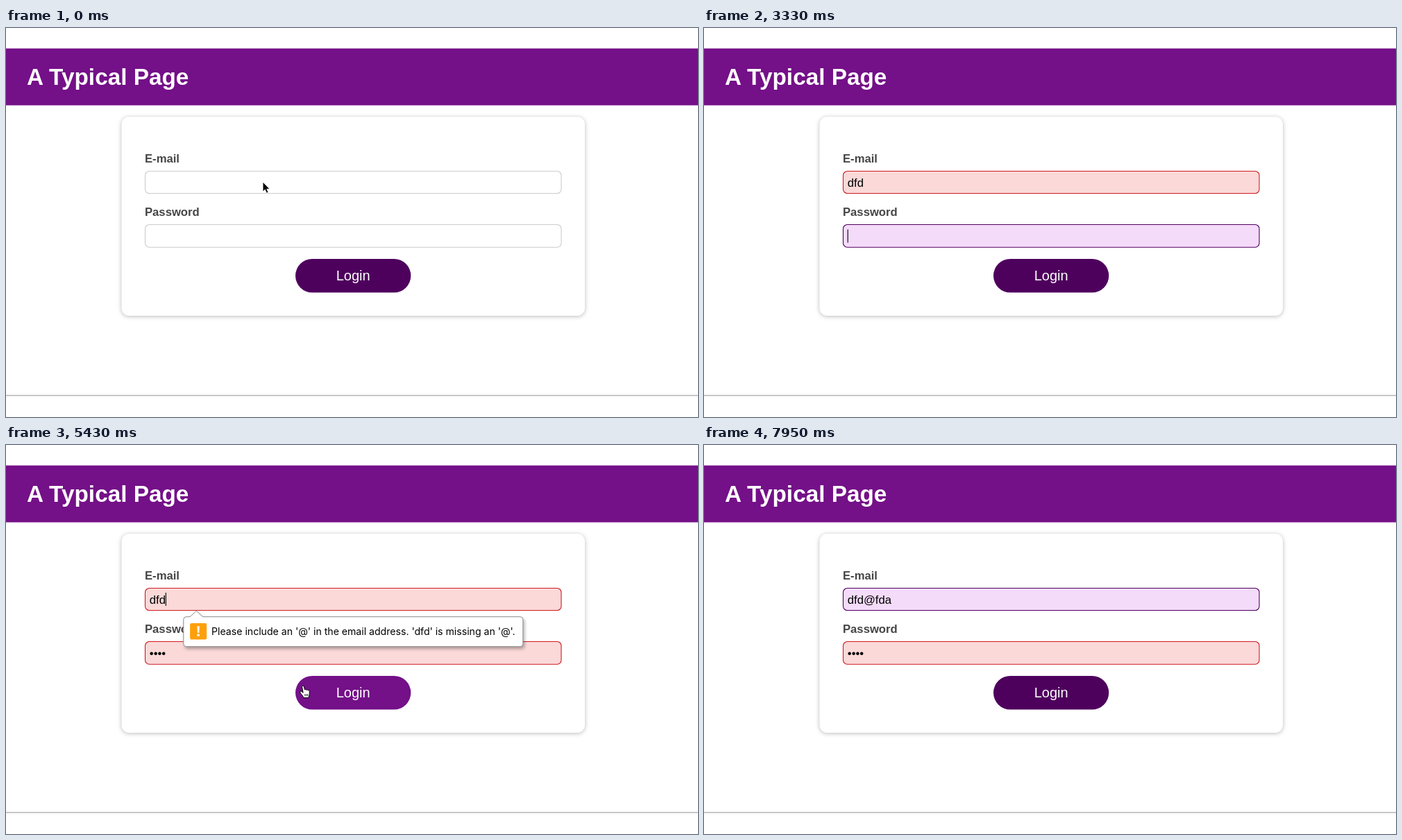
Recreate the animation shown at these times as an HTML page. Size 997 by 561 pixels, loop 8 s.

```html
<!DOCTYPE html>
<html lang="en">
<head>
<meta charset="utf-8">
<title>Login form</title>
<style>
  html, body { margin: 0; width: 100%; height: 100%; overflow: hidden; background: #fff; }
  svg { display: block; width: 100%; height: 100%; }
  text { font-family: "Liberation Sans", Arial, sans-serif; font-size: 16.67px; white-space: pre; }
  .title { font-size: 33.33px; font-weight: bold; fill: #fff; }
  .label { font-weight: bold; fill: #464646; }
  .login { font-size: 20px; fill: #fff; text-anchor: middle; }
  .tip { font-family: Inter, sans-serif; font-size: 14.1px; }
  .card { filter: drop-shadow(0 1.5px 3px rgba(0, 0, 0, .27)); }
  .panel { filter: drop-shadow(2px 3px 2px rgba(0, 0, 0, .3)); }
  .caret { stroke: #000; stroke-width: 1.1; }
</style>
</head>
<body>
<svg viewBox="0 0 997 561">
  <rect y="29.5" width="997" height="82" fill="#741088"/>
  <text class="title" x="30" y="81.5">A Typical Page</text>
  <rect class="card" x="166.5" y="128" width="667.5" height="287" rx="11" fill="#fff"/>
  <path d="M0 530H997" stroke="#b4b4b4" stroke-width="1.4"/>

  <text class="label" x="200" y="194">E-mail</text>
  <rect id="emailBox" x="200.5" y="206.5" width="599.5" height="32" rx="6" stroke-width="1.1"/>
  <text id="email" x="206.8" y="228.5"></text>
  <text class="label" x="200" y="271">Password</text>
  <rect id="passBox" x="200.5" y="283.5" width="599.5" height="32.7" rx="6" stroke-width="1.1"/>
  <text id="pass" x="206.8" y="306"></text>
  <path id="caret" class="caret" d="M0 -9.5V9.5"/>

  <rect id="button" x="417" y="333" width="166.3" height="48.5" rx="24.25"/>
  <text class="login" x="500.2" y="364">Login</text>

  <g id="tip">
    <path class="panel" fill="#fff" stroke="#8c8c8c"
      d="M4 8H9.500L18.500 -.5L27.500 8H485a4 4 0 0 1 4 4V47a4 4 0 0 1 -4 4H4a4 4 0 0 1 -4 -4V12a4 4 0 0 1 4 -4Z"/>
    <rect x="9.300" y="17.300" width="24" height="23.500" rx="2" fill="#ff9f0a"/>
    <path d="M19.600 21.500h3.400l-.5 9.500h-2.400Z" fill="#fff"/>
    <circle cx="21.300" cy="34.500" r="1.900" fill="#fff"/>
    <text class="tip" x="40.300" y="34">Please include an '@' in the email address. 'dfd' is missing an '@'.</text>
  </g>

  <g id="mouse">
    <circle id="ring" r="17.2" fill="none" stroke="#111" stroke-width="1.6"/>
    <path id="arrow" d="M0 -1V13L3.200 10.200L5.500 15.200L8 14.100L5.800 9.300H10Z" fill="#000" stroke="#fff" stroke-width=".9"/>
    <g id="beam" fill="none" stroke-linecap="round">
      <path d="M-3 -8Q0 -8 0 -5.500Q0 -8 3 -8M0 -6V6M-3 8Q0 8 0 5.500Q0 8 3 8M-1.500 2H1.500" stroke="#fff" stroke-width="2.6" opacity=".6"/>
      <path d="M-3 -8Q0 -8 0 -5.500Q0 -8 3 -8M0 -6V6M-3 8Q0 8 0 5.500Q0 8 3 8M-1.500 2H1.500" stroke="#111" stroke-width="1.1"/>
    </g>
    <g id="hand" stroke="#000" stroke-width="1" stroke-linejoin="round">
      <path d="M-3.500 -7.500C-3.500 -9 -1.200 -9 -.8 -7.500L.6 -2.800C1 -4.200 2.700 -4 3 -2.500C3.500 -3.600 5 -3.300 5.200 -2C6 -2.800 7.200 -2.200 7.200 -.8V3C7.200 5 6 6 6 8.500H-1.500C-1.500 6 -4 4.500 -6 1.200C-7.200 -.6 -5.300 -1.800 -3.900 -.4L-1.900 1.400Z" fill="#fff"/>
      <path d="M.8 3V6M2.800 3V6M4.700 3V6" stroke-width=".8"/>
    </g>
  </g>
</svg>
<script>
const LOOP = 8000;
const $ = id => document.getElementById(id);
const set = (id, attrs) => {
  for (const key in attrs) $(id).setAttribute(key, attrs[key]);
};
const show = (id, on) => set(id, { visibility: on ? 'inherit' : 'hidden' });
const within = (t, a, b) => t >= a && t < b;
const ramp = (t, a, b) => Math.min(1, Math.max(0, (t - a) / (b - a)));
const smooth = u => u * u * (3 - 2 * u);
const mix = (a, b, u) => a + (b - a) * u;

const STYLES = {
  plain: { fill: '#fff', stroke: '#ccc' },
  focus: { fill: '#f4dbf9', stroke: '#4f005f' },
  error: { fill: '#fad9d8', stroke: '#d01a20' }
};
const EMAIL_KEYS = [2040, 2220, 2380, 6750, 7080, 7230, 7350];
const PASS_KEYS = [3990, 4140, 4290, 4440];
const FOCUS = { email: 1050, pass: 3150, submit: 5080, click: 5960 };
const CLICKS = [[870, 1050], [4950, 5080], [5790, 5960]];
const RESETS = [...EMAIL_KEYS, ...PASS_KEYS, ...Object.values(FOCUS)];
const MOVES = [
  { from: 4530, to: 4860, x: 430, y: 356 },
  { from: 5590, to: 5790, x: 358.5, y: 217 }
];

const typed = (text, keys, t) => text.slice(0, keys.filter(k => k <= t).length);

function mouseAt(t) {
  let x = 370, y = 223;
  for (const m of MOVES) {
    const u = smooth(ramp(t, m.from, m.to));
    x = mix(x, m.x, u);
    y = mix(y, m.y, u);
  }
  return { x, y };
}

function drawFields(t) {
  const email = typed('dfd@fda', EMAIL_KEYS, t);
  const pass = typed('••••', PASS_KEYS, t);
  const inPass = within(t, FOCUS.pass, FOCUS.submit);
  $('email').textContent = email;
  $('pass').textContent = pass;

  let emailStyle = t < FOCUS.email ? 'plain' : 'focus';
  if (email && !email.includes('@')) emailStyle = 'error';
  set('emailBox', STYLES[emailStyle]);
  set('passBox', STYLES[pass ? 'error' : inPass ? 'focus' : 'plain']);

  const last = Math.max(...RESETS.filter(r => r <= t));
  show('caret', t >= FOCUS.email && (t - last) % 1000 < 500);
  const value = inPass ? $('pass') : $('email');
  const x = 207.2 + (value.textContent ? value.getComputedTextLength() : 0);
  set('caret', { transform: `translate(${x} ${inPass ? 300 : 222.5})` });
}

function drawMouse(t) {
  const { x, y } = mouseAt(t);
  const onButton = x > 417 && x < 583 && y > 333 && y < 381;
  const onField = t >= 870 && (within(y, 206, 239) || within(y, 283, 316));
  const visible = t < EMAIL_KEYS[0] || within(t, MOVES[0].from, EMAIL_KEYS[3]);
  set('mouse', { transform: `translate(${x} ${y})` });
  show('mouse', visible);
  show('hand', visible && onButton);
  show('beam', visible && onField);
  show('arrow', visible && !onButton && !onField);
  show('ring', visible && CLICKS.some(([a, b]) => within(t, a, b)));
  set('button', { fill: visible && onButton ? '#741088' : '#4e005d' });
}

function drawTip(t) {
  const grow = smooth(ramp(t, 5100, 5400));
  const opacity = grow * (1 - ramp(t, 5960, 6180));
  set('tip', { opacity, transform: `translate(255.8 239.7) scale(${mix(.962, 1, grow)} 1)` });
  show('tip', opacity > 0);
}

function draw(t) {
  drawFields(t);
  drawMouse(t);
  drawTip(t);
}

const start = performance.now();
function tick() {
  draw((performance.now() - start) % LOOP);
  requestAnimationFrame(tick);
}
draw(0);
requestAnimationFrame(tick);
</script>
</body>
</html>
```
